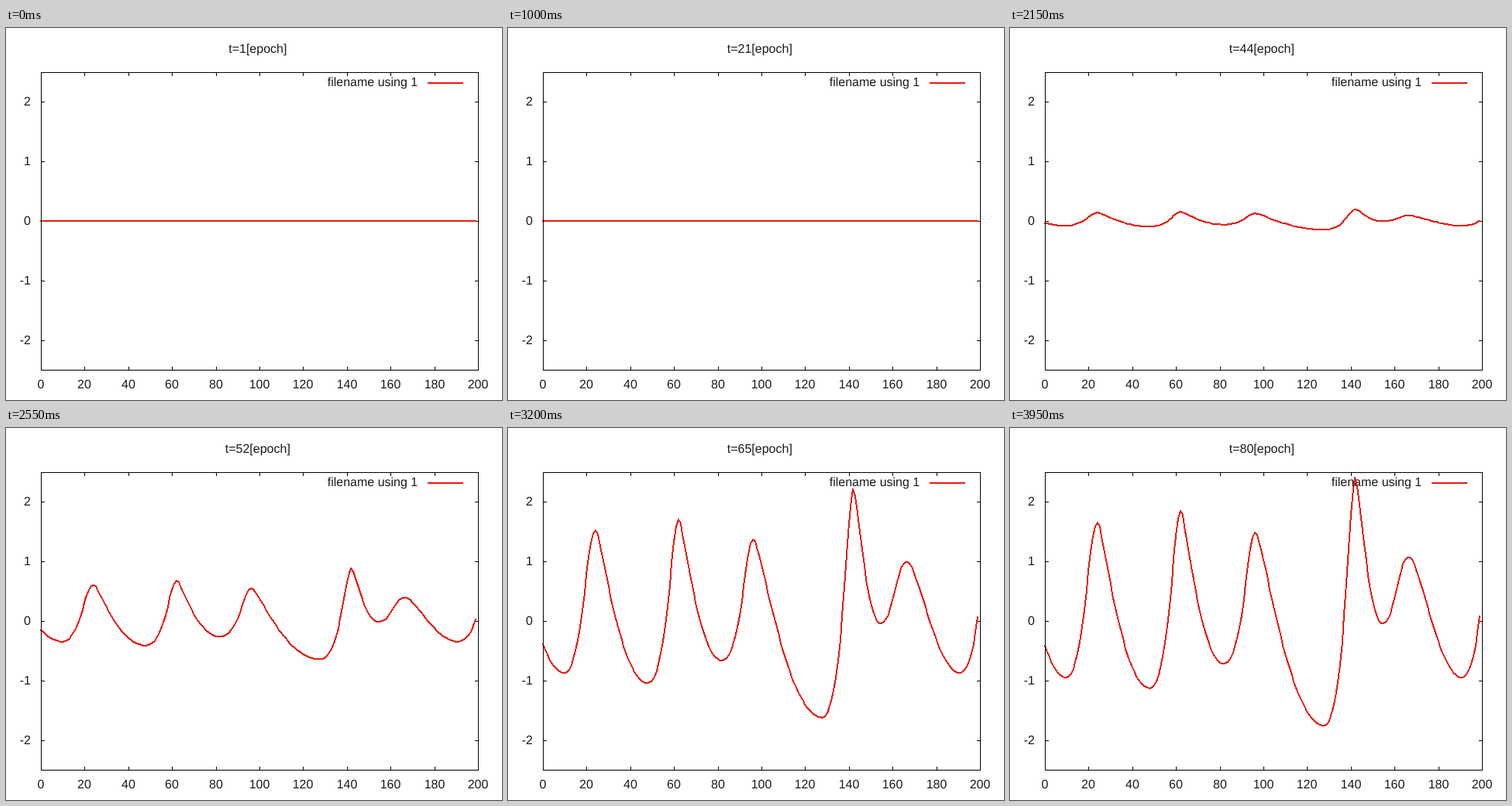
An HTML page that plays this animation: 640 by 480 pixels, repeating every 4 s.

```html
<!DOCTYPE html>
<html lang="en">
<head>
<meta charset="utf-8">
<style>
  html, body { margin: 0; width: 100%; height: 100%; overflow: hidden; background: #fff; }
  svg { display: block; }
  text {
    font: 16px "Liberation Sans", Arial, sans-serif;
    text-anchor: middle; text-rendering: geometricPrecision; fill: #1a1a1a;
  }
  path, rect, polyline { fill: none; shape-rendering: crispEdges; }
  .axis { stroke: #000; stroke-width: 1; }
  .red { stroke: #e51e10; stroke-width: 2; stroke-linecap: square; stroke-linejoin: round; }
</style>
</head>
<body>
<svg width="640" height="480" viewBox="0 0 640 480">
  <path id="ticks" class="axis"/>
  <g id="labels"></g>
  <text id="title" x="324.8" y="32"></text>
  <text x="473" y="75">filename using 1</text>
  <path class="red" d="M545 71H589"/>
  <polyline id="curve" class="red"/>
  <rect class="axis" x="45.5" y="57.5" width="564" height="384"/>
</svg>
<script>
const LEFT = 45, RIGHT = 609, TOP = 57, BOTTOM = 441, ZERO = 249;
const FRAME = 50, COUNT = 80;
const $ = id => document.getElementById(id);
const toX = i => Math.round(LEFT + i * (RIGHT - LEFT) / 200);
const toY = v => Math.round(ZERO - v * 76.8);

// Crests and troughs: index, value, and how far along the span from the last one is half done
const turns = [
  [-6, .12], [9.7, -.95, .38], [24.2, 1.655, .61], [48, -1.13, .33], [62.3, 1.855, .65],
  [81.7, -.72, .33], [96.2, 1.49, .65], [127.8, -1.758, .345], [142.2, 2.41, .67],
  [154.4, -.045, .345], [166.6, 1.074, .53], [190.8, -.95, .41], [205, 1.655, .64]
];

// Eased span between two turns: a Bezier curve, level at both ends
function height(i) {
  const k = turns.findIndex(turn => turn[0] > i);
  const [x0, y0] = turns[k - 1], [x1, y1, half] = turns[k];
  const reach = y1 > y0 ? .45 : .32, lean = (8 * half - 4) / 6;
  const a = reach + lean, b = 1 - reach + lean;
  const u = (i - x0) / (x1 - x0);
  let low = 0, high = 1, s;
  for (let n = 0; n < 24; n++) {
    s = (low + high) / 2;
    const x = 3 * s * (1 - s) * ((1 - s) * a + s * b) + s ** 3;
    if (x < u) low = s; else high = s;
  }
  return y0 + (y1 - y0) * s * s * (3 - 2 * s);
}
const shape = Array.from({ length: 200 }, (_, i) => height(i));

// Logistic growth over the epochs
const growth = epoch => 1.003 / (1 + Math.exp(-0.231 * (epoch - 54.4)));

function drawAxes() {
  let ticks = "", labels = "";
  for (let v = 0; v <= 200; v += 20) {
    const x = toX(v);
    ticks += `M${x + .5} ${TOP}v5M${x + .5} ${BOTTOM + 1}v-5`;
    labels += `<text x="${x}" y="465">${v}</text>`;
  }
  for (let v = -2; v <= 2; v++) {
    const y = toY(v);
    ticks += `M${LEFT} ${y + .5}h5M${RIGHT + 1} ${y + .5}h-5`;
    labels += `<text x="32" y="${y + 5}" style="text-anchor:end">${v}</text>`;
  }
  $("ticks").setAttribute("d", ticks);
  $("labels").innerHTML = labels;
}

let shown = 0;
function draw(now) {
  const epoch = Math.floor(now / FRAME) % COUNT + 1;
  if (epoch === shown) return;
  shown = epoch;
  const size = growth(epoch);
  $("title").textContent = `t=${epoch}[epoch]`;
  $("curve").setAttribute("points", shape.map((v, i) => `${toX(i)},${toY(v * size)}`).join(" "));
}

function loop() {
  draw(performance.now());
  requestAnimationFrame(loop);
}
drawAxes();
loop();
</script>
</body>
</html>
```
